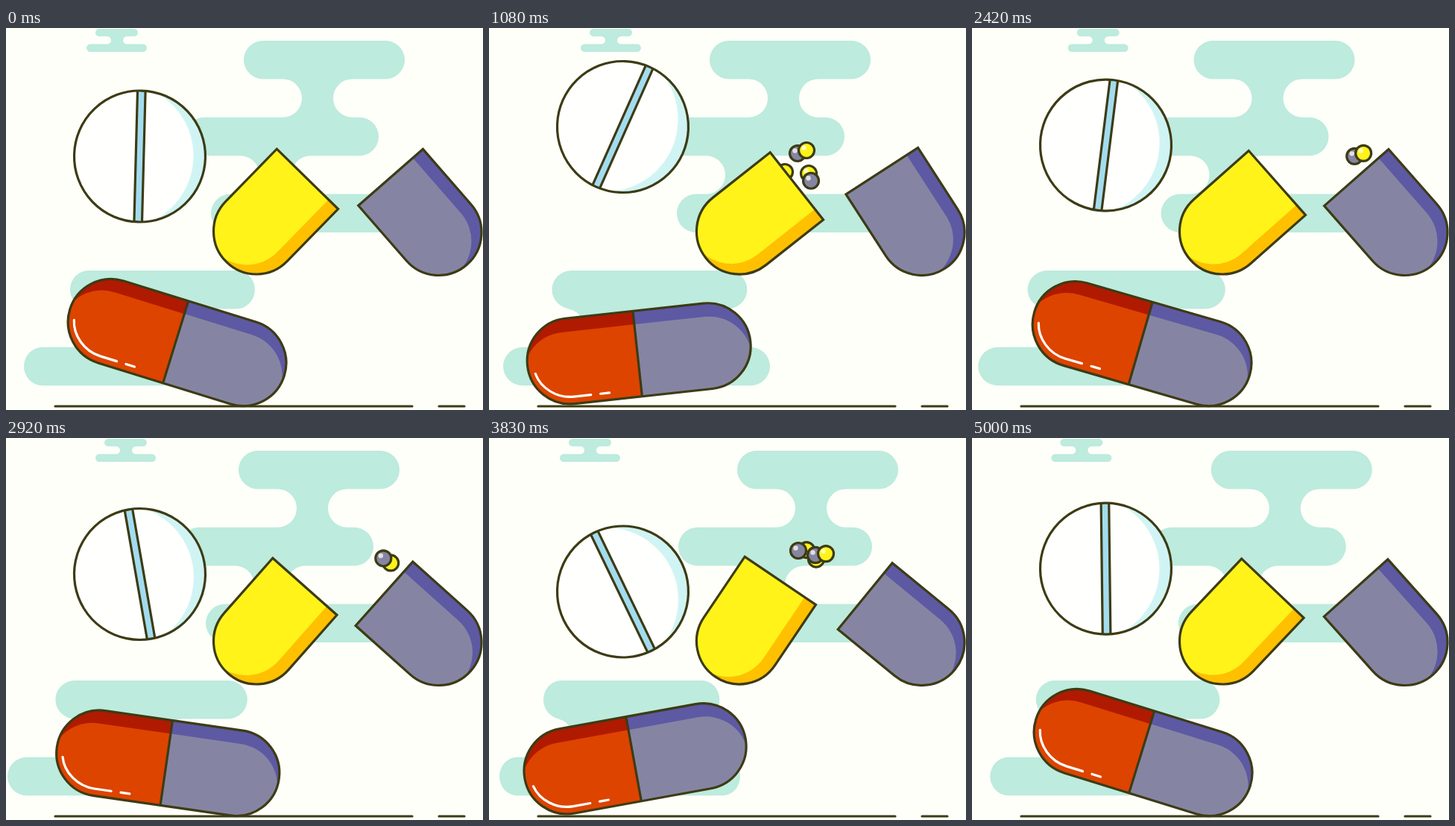
An HTML page with a canvas for the animation above (5080 ms loop, 640 by 512 pixels).

```html
<!DOCTYPE html>
<html lang="en">
<head>
<meta charset="utf-8">
<title>Pills</title>
<style>
  html, body { margin: 0; width: 100%; height: 100%; overflow: hidden; background: rgb(255, 255, 250); }
  canvas { display: block; }
</style>
</head>
<body>
<canvas id="stage" width="640" height="512"></canvas>
<script>
const ctx = document.getElementById('stage').getContext('2d');
const LOOP = 5080, STEP = 1000 / 12, RAD = Math.PI / 180;
const INK = '#3d3b14', MINT = '#bdebdd', PAPER = 'rgb(255, 255, 250)';
const RED = '#dd4400', DARK_RED = '#b01a00', PURPLE = '#8585a3', DARK_PURPLE = '#5d59a3';
const YELLOW = 'rgb(255, 243, 26)', AMBER = 'rgb(255, 192, 0)';

// Smooth periodic curve through a few poses.
function track(times, period, values) {
  const n = times.length;
  const T = i => times[(i + n) % n] + period * Math.floor(i / n);
  const V = i => values[(i + n) % n];
  const rise = i => (V(i + 1) - V(i)) / (T(i + 1) - T(i));
  const slope = i => {
    const before = T(i) - T(i - 1), after = T(i + 1) - T(i);
    return (rise(i - 1) * after + rise(i) * before) / (before + after);
  };
  return time => {
    const t = time % period;
    const i = times.filter(k => k <= t).length - 1;
    const h = T(i + 1) - T(i), u = (t - T(i)) / h, v = 1 - u;
    return V(i) * v * v * (1 + 2 * u) + V(i + 1) * u * u * (3 - 2 * u)
      + h * u * v * (slope(i) * v - slope(i + 1) * u);
  };
}
const sway = (...values) => track([0, 13, 24, 35, 46, 54], 61, values);

const tabletY = sway(172, 132.5, 138.5, 182.5, 206, 193);
const tabletTilt = sway(1.5, 24, 19.6, -9.9, -25.8, -14.6);
const yellowTilt = sway(44.3, 51.7, 53.1, 41.5, 34, 38.3);
const purpleTilt = sway(-41.1, -32.9, -35.8, -48.2, -50.7, -46.4);
const bigCloudX = sway(319, 296, 289, 312, 333, 331);
const smallCloudX = sway(108, 123, 132, 120, 95, 96);
const lowCloudX = sway(24, 19, 15, 2, 14, 25);
const lowCloudWidth = sway(339, 358, 367, 352, 323, 324);
const rock = track([0, 5, 13, 16, 24], 30, [17.2, 8.2, -6.2, -10.3, 1.5]);

// Each ball: colour, x at the middle of the flight, speed, then apex x, apex y and bend of its arc.
const flights = [
  { start: 6, end: 33, middle: 13, balls: [
    [YELLOW, 397, 8.36, 449, 168.4, .0091],
    [YELLOW, 429, 8.1, 471, 175.6, .011],
    [PURPLE, 432, 9, 471, 188, .011],
    [PURPLE, 414, 6.2, 462, 140, .01215],
    [YELLOW, 426, 6.2, 474, 136, .01215]] },
  { start: 31, end: 55, middle: 46, balls: [
    [YELLOW, 426, -8.2, 455, 145, .006],
    [YELLOW, 439, -8.3, 455, 160, .01],
    [PURPLE, 415, -8.3, 455, 135, .01],
    [PURPLE, 438, -8.3, 455, 154, .01],
    [YELLOW, 452, -8.3, 455, 155, .01]] }
];

function at(x, y, degrees, paint) {
  ctx.save();
  ctx.translate(x, y);
  ctx.rotate(degrees * RAD);
  paint();
  ctx.restore();
}

function shape(build, fill, outline) {
  ctx.beginPath();
  build();
  if (fill) { ctx.fillStyle = fill; ctx.fill(); }
  if (outline) { ctx.strokeStyle = outline; ctx.stroke(); }
}

const circle = (x, y, r) => () => ctx.arc(x, y, r, 0, 2 * Math.PI);
const line = (x1, y1, x2, y2) => () => { ctx.moveTo(x1, y1); ctx.lineTo(x2, y2); };

// Left and right edges alternate between round bars and the waists joining them.
function cloud(x, y, size, edges, stretch = 1) {
  ctx.save();
  ctx.translate(x, y);
  ctx.scale(stretch, 1);
  shape(() => {
    const r = size / 2;
    for (let i = 0; i < edges.length; i += 2) {
      const left = edges[i], right = edges[i + 1], top = size * i / 2;
      if (i % 4 === 0) {
        ctx.roundRect(left, top, right - left, size, r);
      } else {
        ctx.moveTo(right + r, top);
        ctx.arc(right + r, top + r, r, 1.5 * Math.PI, .5 * Math.PI, true);
        ctx.arc(left - r, top + r, r, .5 * Math.PI, -.5 * Math.PI, true);
        ctx.closePath();
      }
    }
  }, MINT);
  ctx.restore();
}

function tablet(y, tilt) {
  at(179.5, y, tilt, () => {
    const rim = circle(0, 0, 88);
    shape(rim, 'rgb(208, 244, 244)');
    ctx.save();
    ctx.clip();
    shape(circle(-25, 0, 97), 'rgb(255, 255, 253)');
    shape(() => ctx.rect(-5.3, -95, 10.6, 190), 'rgb(163, 220, 239)', INK);
    ctx.restore();
    shape(rim, null, INK);
  });
}

function halfCapsule(x, y, tilt, light, dark) {
  const body = dx => () => {
    ctx.moveTo(dx - 57.5, -98);
    ctx.lineTo(dx + 57.5, -98);
    ctx.arc(dx, 0, 57.5, 0, Math.PI);
    ctx.closePath();
  };
  at(x, y, tilt, () => {
    shape(body(0), dark);
    ctx.save();
    ctx.clip();
    shape(body(-18), light);
    ctx.restore();
    shape(body(0), null, INK);
  });
}

// Rolls on whichever round end touches the ground.
function capsule(tilt) {
  const side = tilt > .8 ? 1 : -1;
  const body = (dx, dy) => () => ctx.roundRect(dx - 150.5, dy - 57.5, 301, 115, 57.5);
  at(208 + side * 93 + 58 * tilt * RAD, side > 0 ? 449 : 446.4, tilt, () => {
    ctx.translate(-side * 93, 0);
    for (const [x, dark, light, dx] of [[-162, DARK_RED, RED, -7], [-2, DARK_PURPLE, PURPLE, 0]]) {
      ctx.save();
      ctx.beginPath();
      ctx.rect(x, -70, 160, 140);
      ctx.clip();
      shape(body(0, 0), dark);
      ctx.clip();
      shape(body(dx, 18), light);
      ctx.restore();
    }
    shape(line(-2, -57, -2, 57), null, INK);
    shape(body(0, 0), null, INK);
    shape(() => {
      ctx.moveTo(-141, 12);
      ctx.bezierCurveTo(-136, 32, -116, 48, -93, 48);
      ctx.lineTo(-70, 48);
      line(-57, 48, -45, 48)();
    }, null, PAPER);
  });
}

function drawBalls(step) {
  for (const { start, end, middle, balls } of flights) {
    if (step < start || step > end) continue;
    for (const [color, middleX, speed, apexX, apexY, bend] of balls) {
      const x = Math.min(550, Math.max(365, middleX + speed * (step - middle)));
      const y = apexY + bend * (x - apexX) ** 2;
      shape(circle(x, y, 10.5), color, INK);
      shape(circle(x - 3.5, y - 3.5, 3.2), 'rgba(255, 255, 245, .75)');
    }
  }
}

function draw(step) {
  ctx.fillStyle = PAPER;
  ctx.fillRect(0, 0, 640, 512);
  ctx.lineWidth = 3.2;
  ctx.lineCap = 'round';
  cloud(smallCloudX(step), 1, 10.3, [12, 69, 33, 49, 0, 81]);
  cloud(bigCloudX(step), 17, 51.4, [0, 216, 78, 120, -79, 181, 21, 64, -44, 240]);
  cloud(lowCloudX(step), 325, 51.4, [64, 320, 107, 208, 0, 350], lowCloudWidth(step) / 350);
  shape(line(66, 507, 545, 507), null, INK);
  shape(line(581, 507, 615, 507), null, INK);
  tablet(tabletY(step), tabletTilt(step));
  drawBalls(step);
  halfCapsule(336, 272.5, yellowTilt(step), YELLOW, AMBER);
  halfCapsule(580.5, 274, purpleTilt(step), PURPLE, DARK_PURPLE);
  capsule(rock(step));
}

// The motion advances at twelve poses a second.
function tick() {
  const t = performance.now() % LOOP;
  draw(Math.min(60, Math.floor((t + 3.5) / STEP)));
  requestAnimationFrame(tick);
}
tick();
</script>
</body>
</html>
```
